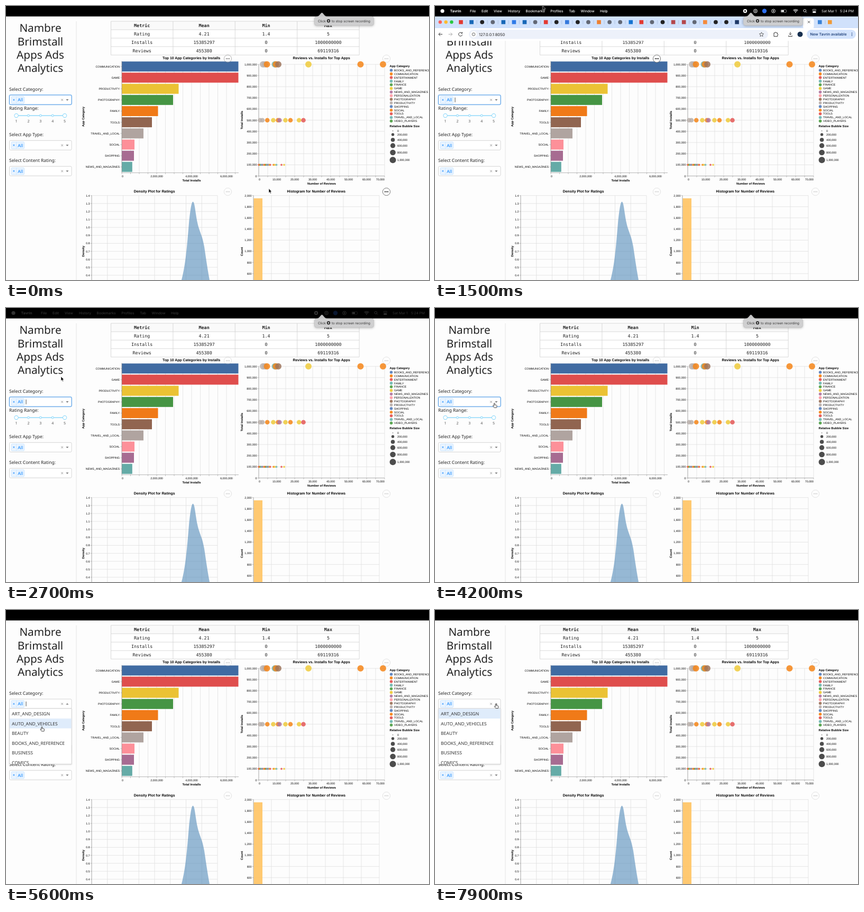
Write an HTML page that moves like this. It is 800 by 520 pixels and loops after 8000 ms.

```html
<!DOCTYPE html>
<html lang="en">
<head>
<meta charset="utf-8">
<title>Apps dashboard</title>
<style>
html, body { margin: 0; width: 100%; height: 100%; overflow: hidden; background: #fdfdfd; }
svg { display: block; width: 800px; height: 520px; font-family: "Liberation Sans", Arial, sans-serif; text-rendering: geometricPrecision; }
.ui { font-family: "Noto Sans", sans-serif; }
.mac { font-family: Inter, sans-serif; }
.mono { font-family: "DejaVu Sans Mono", monospace; }
.anim { animation: 8s linear infinite; }
.step { animation-timing-function: step-end; }

#mouse { animation-name: mouse; animation-timing-function: ease-in-out; }
@keyframes mouse {
  0% { transform: translate(497px, 346.5px); }
  3% { transform: translate(496px, 340px); }
  12.5% { transform: translate(260px, 40px); }
  16.5%, 24% { transform: translate(203.5px, -.5px); }
  33.75% { transform: translate(104px, 130px); }
  37.5%, 39.5% { transform: translate(106px, 145px); }
  50%, 62.5% { transform: translate(112.5px, 180.5px); }
  70%, 72% { transform: translate(68px, 221.5px); }
  80%, 82% { transform: translate(115px, 180px); }
  86.25%, 89% { transform: translate(116.3px, 195.2px); }
  94%, 100% { transform: translate(115.5px, 178px); }
}
#hand { animation-name: hand; }
@keyframes hand { 0% { opacity: 0; } 48% { opacity: 1; } 84% { opacity: 0; } 92.5%, 100% { opacity: 1; } }
#arrow { animation-name: arrow; }
@keyframes arrow { 0% { opacity: 1; } 48% { opacity: 0; } 84% { opacity: 1; } 92.5%, 100% { opacity: 0; } }

.open { animation-name: open; }
@keyframes open { 0% { visibility: hidden; } 62.5% { visibility: visible; } 81.25% { visibility: hidden; } 96.25%, 100% { visibility: visible; } }
.shut { animation-name: shut; }
@keyframes shut { 0% { visibility: visible; } 62.5% { visibility: hidden; } 81.25% { visibility: visible; } 96.25%, 100% { visibility: hidden; } }
#row { animation-name: row; }
@keyframes row { 0% { transform: none; } 67.5% { transform: translateY(18.6px); } 76% { transform: none; } 100% { transform: none; } }
#caret { animation: caret 1s -.7s step-end infinite; }
@keyframes caret { 0% { opacity: 1; } 50%, 100% { opacity: 0; } }

#bar { animation-name: bar; }
@keyframes bar { 0%, 13.5% { transform: translateY(-47px); } 17%, 28.5% { transform: none; } 32%, 100% { transform: translateY(-47px); } }
#menu { animation-name: menu; }
@keyframes menu { 0%, 12.5% { opacity: 0; } 16.5%, 28% { opacity: 1; } 33.75% { opacity: .2; } 37.5%, 100% { opacity: 0; } }
#tip { animation-name: tip; }
@keyframes tip { 0%, 60.5% { opacity: 1; } 63.5%, 100% { opacity: 0; } }
#more0 { animation-name: more0; }
@keyframes more0 { 0% { opacity: .55; } 2.5%, 6% { opacity: .2; } 11%, 26% { opacity: 1; } 31%, 100% { opacity: .2; } }
#more3 { animation-name: more3; }
@keyframes more3 { 0%, 3% { opacity: 1; } 8%, 100% { opacity: .2; } }
</style>
</head>
<body>
<svg id="stage" viewBox="0 0 800 520"></svg>
<script>
const range = n => [...Array(n).keys()];
const each = (list, fn) => list.map(fn).join('');
const rect = (x, y, w, h, fill, more = '') => `<rect x="${x}" y="${y}" width="${w}" height="${h}" fill="${fill}" ${more}/>`;
const dot = (x, y, r, fill, more = '') => `<circle cx="${x}" cy="${y}" r="${r}" fill="${fill}" ${more}/>`;
const path = (d, stroke, w = 1, fill = 'none') => `<path d="${d}" stroke="${stroke}" stroke-width="${w}" fill="${fill}"/>`;
// y is the vertical middle of the capitals
const text = (x, y, s, size, more = '') => `<text x="${x}" y="${y + size * .36}" font-size="${size}" ${more}>${s}</text>`;
const mid = 'text-anchor="middle"', end = 'text-anchor="end"', bold = 'font-weight="700"';
const commas = n => n.toLocaleString('en-US');

const GRID = '#dcdcdc', AXIS = '#888';
const hue = {
  blue: '#5b82bd', orange: '#f58518', red: '#e45756', teal: '#72b7b2', green: '#54a24b', yellow: '#eeca3b',
  purple: '#b279a2', pink: '#ff9da6', brown: '#9d755d', gray: '#bab0ac'
};

const title = (x, y, s) => text(x, y, s, 6.87, `${mid} ${bold}`);
const label = (x, y, s, more = mid) => text(x, y, s, 5.3, more);
const axisName = (x, y, s) => text(x, y, s, 5.8, `${mid} ${bold}`);
const sideName = (x, y, s) => `<g transform="translate(${x} ${y}) rotate(-90)">${axisName(0, 0, s)}</g>`;
const gridX = (xs, top, bottom) => path(each(xs, x => `M${x} ${top}V${bottom}`), GRID, .7);
const gridY = (ys, left, right) => path(each(ys, y => `M${left} ${y}H${right}`), GRID, .7);
const ticksX = (xs, y) => path(each(xs, x => `M${x} ${y}v2.6`), AXIS, .5);
const ticksY = (ys, x) => path(each(ys, y => `M${x} ${y}h-2.6`), AXIS, .5);

function sidebar() {
  const box = y => rect(6.5, y, 117.5, 18, '#fff', 'rx="2" stroke="#ccc" stroke-width=".8"');
  const tag = y => rect(10, y - 6.5, 24.5, 13, '#ebf5ff', 'rx="1.5" stroke="#b9dcff" stroke-width=".7"')
    + path(`M19.7 ${y - 6.5}v13`, '#b9dcff', .6)
    + text(14.9, y - .3, '×', 8, `${mid} fill="#007eff"`) + text(27.2, y, 'All', 8.5, `${mid} fill="#007eff"`)
    + path(`M104.2 ${y - 2}l3.8 3.8m0 -3.8l-3.8 3.8`, '#888', .8);
  const down = y => path(`M113.3 ${y - 1.3}h5.2l-2.6 2.7z`, 'none', 0, '#777');
  const xs = range(5).map(i => 19.5 + i * 22.9);
  return path('M133 29V520', '#ddd', .8) + '<g class="ui" fill="#222">'
    + each(['Nambre', 'Brimstall', 'Apps Ads', 'Analytics'], (s, i) => text(65, 42 + i * 25.3, s, 20.7, mid))
    + each([[158, 'Select Category:'], [194, 'Rating Range:'], [244.2, 'Select App Type:'], [293.2, 'Select Content Rating:']], ([y, s]) => text(6, y, s, 8.5))
    + each([169, 255.3, 304.3], box)
    + `<g class="anim step shut">${rect(6.5, 169, 117.5, 18, '#fff', 'rx="2" stroke="#c9e2fb" stroke-width="2.4"')}${rect(6.5, 169, 117.5, 18, '#fff', 'rx="2" stroke="#3d8fe0" stroke-width=".9"')}${down(178.3)}</g>`
    + each([178.3, 264.5, 313.5], tag) + down(264.5) + down(313.5)
    + `<g class="anim step open">${path('M113.3 179.6h5.2l-2.6 -2.7z', 'none', 0, '#777')}</g>`
    + `<path id="caret" d="M38 173.7v9" stroke="#222" stroke-width=".8"/>`
    + path('M19.5 208H111', '#abe2fb', 2)
    + each(xs, (x, i) => dot(x, 208, i % 4 ? 1.9 : 3.6, '#fff', 'stroke="#96dbfa" stroke-width="1.1"') + text(x, 218.6, i + 1, 7, `${mid} fill="#555"`))
    + '</g>';
}

function dropdown() {
  const names = ['ART_AND_DESIGN', 'AUTO_AND_VEHICLES', 'BEAUTY', 'BOOKS_AND_REFERENCE', 'BUSINESS', 'COMICS'];
  return `<g class="ui anim step open"><clipPath id="list"><rect x="6" y="187" width="119" height="105"/></clipPath>`
    + rect(6.5, 187, 117.5, 105.3, '#fff', 'stroke="#ccc" stroke-width=".8" style="filter:drop-shadow(0 1px 1px #0002)"')
    + `<g clip-path="url(#list)"><g id="row" class="anim step">${rect(6.9, 187.4, 116.7, 18.6, '#dfecfb')}</g>`
    + each(names, (s, i) => text(11, 197 + i * 18.55, s, 8.5, 'fill="#333"')) + '</g></g>';
}

function table() {
  const rows = [['Metric', 'Mean', 'Min', 'Max'], ['Rating', '4.21', '1.4', '5'], ['Installs', '15385297', '0', '1000000000'], ['Reviews', '455380', '0', '69119316']];
  return rect(198.5, 29, 469.5, 64, '#fff') + rect(198.5, 29, 469.5, 16, '#fafafa')
    + path(each(range(5), i => `M198.5 ${29 + i * 16}H668M${198.5 + i * 117.4} 29V93`), '#d0d0d0', .8)
    + '<g class="mono" fill="#222">'
    + each(rows, (r, j) => each(r, (s, i) => text(257.2 + i * 117.4, 37 + j * 16, s, 8.4, mid + (j ? '' : ' ' + bold)))) + '</g>';
}

function barChart() {
  const bars = [['COMMUNICATION', 439.5, '#406ba2'], ['GAME', 439.5, '#df4e4d'], ['PRODUCTIVITY', 326.5, '#ebc234'], ['PHOTOGRAPHY', 316, '#469544'], ['FAMILY', 287.5, '#f07a18'],
    ['TOOLS', 276, '#916550'], ['TRAVEL_AND_LOCAL', 260, '#b0a4a0'], ['SOCIAL', 243, '#fd9099'], ['SHOPPING', 242, '#a76c92'], ['NEWS_AND_MAGAZINES', 238.8, '#65aba7']];
  const xs = range(14).map(i => 219 + i * 16.5), y = i => 114.8 + i * 21.17;
  return gridX(xs, 105, 316.5)
    + each(bars, ([s, x, fill], i) => rect(219, y(i) - 9.5, x - 219, 19, fill) + label(215, y(i), s, end))
    + path('M219 104.5V316.5H440', AXIS, .6) + ticksX(xs, 316.5) + ticksY(range(10).map(y), 219)
    + label(220.5, 323, '0') + each([1, 2, 3], i => label(219 + i * 66, 323, commas(i * 2e6)))
    + title(350.7, 98.6, 'Top 10 App Categories by Installs')
    + axisName(351, 330.5, 'Total Installs') + sideName(146, 210, 'App Category');
}

function scatter() {
  const { blue, orange, red, teal, green, yellow, purple, pink, brown, gray } = hue;
  const xs = range(15).map(i => 478 + i * 17), ys = range(11).map(i => 322.6 - i * 21.18);
  const point = (y, r) => ([x, fill]) => dot(x, y, r, fill, 'opacity=".85"');
  const top = [[486, gray], [490, gray], [493.5, orange], [508.5, teal], [510.5, orange], [515, brown], [572, yellow], [670.5, orange], [713, orange]];
  const middle = [[480.5, gray], [485, gray], [494.2, orange], [505.5, yellow], [514.5, orange], [517.3, purple], [528.5, yellow], [538, orange], [554.2, yellow], [562.5, red]];
  const cycle = [red, blue, teal, orange, yellow, purple, green];
  const low = range(15).map(i => [478 + i * 1.55, cycle[i * 3 % 7]]).concat([[506, orange], [508.5, yellow], [511.5, teal], [521, red], [526, yellow]]);
  const kinds = ['BOOKS_AND_REFERENCE', 'COMMUNICATION', 'ENTERTAINMENT', 'FAMILY', 'FINANCE', 'GAME', 'NEWS_AND_MAGAZINES', 'PERSONALIZATION', 'PHOTOGRAPHY', 'PRODUCTIVITY', 'SHOPPING', 'SOCIAL', 'TOOLS', 'TRAVEL_AND_LOCAL', 'VIDEO_PLAYERS'];
  const colors = Object.values(hue), left = 'text-anchor="start"';
  const sizes = [237, 244, 254, 265, 278, 292.3];
  return gridX(xs, 110.8, 322.6) + gridY(ys, 478, 716)
    + path('M478 110.8V322.6H716', AXIS, .6) + ticksX(xs, 322.6) + ticksY(ys, 478)
    + each(low, point(301.4, 1.9)) + each(middle, point(216.7, 4.3)) + each(top, point(110.8, 6))
    + each(ys, (y, i) => label(474.5, y, commas(i * 1e5), end))
    + label(479.5, 329, '0') + each(range(6), i => label(512 + i * 34, 329, commas((i + 1) * 1e4))) + label(716, 329, '70,000', end)
    + title(596.7, 98.6, 'Reviews vs. Installs for Top Apps')
    + axisName(597, 336.8, 'Number of Reviews') + sideName(445.5, 216.5, 'Total Installs')
    + text(725.5, 113.6, 'App Category', 5.8, bold)
    + each(kinds, (s, i) => dot(728.6, 122 + i * 6.88, 2.8, colors[i % 10], 'opacity=".95"') + label(734, 122 + i * 6.88, s, left))
    + text(725.5, 228.4, 'Relative Bubble Size', 5.8, bold)
    + each(sizes, (y, i) => dot(731.6, y, i ? 6 * Math.sqrt(i / 5) : .7, '#4d4d4d') + label(740, y, commas(i * 2e5), left));
}

function density() {
  const xs = range(9).map(i => 162 + i * 29.75), ys = range(12).map(i => 359.7 + i * 15.13);
  return gridX(xs, 359.7, 520) + gridY(ys, 162, 400)
    + path('M329 530C339 500 342 460 346 412C349 384 351 371.5 353.5 371.5C357 371.5 358 392 362 411C366 430 371 433 375 457C379 484 382 506 387 530Z', 'none', 0, '#4682b48f')
    + path('M162 359.7V520', AXIS, .6) + ticksY(ys, 162)
    + each(ys, (y, i) => label(158.5, y, (1.4 - i / 10).toFixed(1), end))
    + title(280.7, 351.2, 'Density Plot for Ratings') + sideName(146, 465.5, 'Density');
}

function histogram() {
  const xs = range(8).map(i => 468 + i * 34), ys = range(8).map(i => 359.7 + i * 21.17);
  return gridX(xs, 359.7, 520) + gridY(ys, 468, 706) + rect(468.5, 365, 16.5, 155, '#ffc76a', 'opacity=".95"')
    + path('M468 359.7V520', AXIS, .6) + ticksY(ys, 468)
    + each(ys, (y, i) => label(464.5, y, commas(2000 - i * 200), end))
    + title(586.8, 351.2, 'Histogram for Number of Reviews') + sideName(446, 466, 'Count');
}

const more = (x, y, i) => `<g id="more${i}" class="anim" opacity=".2">${dot(x, y, 7.1, '#fff', 'stroke="#666" stroke-width=".9"')}${each([-2.7, 0, 2.7], d => dot(x + d, y, 1, '#111'))}</g>`;

function browser() {
  const B = '#1868b7', K = '#222', G = '#626875', R = '#e33a32';
  const tabs = [R, B, K, G, B, '#2f7be8', B, G, R, K, '#3579dc', K, G, '#ee8030', G, G, '#1674d1', R, G, K, '#b4474c', '#b4474c', G, '#f58a3a', K, K, '#1f3a68'];
  return `<clipPath id="below"><rect y="19.8" width="800" height="47"/></clipPath><g clip-path="url(#below)"><g id="bar" class="anim mac">`
    + rect(0, 19.8, 800, 24, '#d0e1fb') + rect(0, 42, 800, 24.3, '#fff') + rect(696, 23, 20.5, 20, '#fff', 'rx="4"')
    + each(['#ff5f57', '#febc2e', '#28c840'], (c, i) => dot(9.8 + i * 10.8, 30.5, 3.2, c))
    + each(tabs, (c, i) => {
      const x = 49 + i * 20.08;
      return (c === K || c === G ? dot(x, 30.6, 3.9, c) : rect(x - 3.8, 26.8, 7.6, 7.6, c)) + path(`M${x + 10} 27v7.5`, '#a4bad8', .7);
    })
    + path('M705 28.3l4.2 4.2m0 -4.2l-4.2 4.2', '#333', .9)
    + rect(724, 26.8, 7.6, 7.6, '#3b83d6') + rect(743, 26.8, 7.6, 7.6, '#f09a36') + path('M738 27v7.5', '#a4bad8', .7)
    + rect(64, 45, 566, 17.4, '#edf1fa', 'rx="8.7"') + dot(73, 53.7, 6, '#fff') + dot(73, 53.7, 2.8, 'none', 'stroke="#444" stroke-width=".8"')
    + text(83, 53.8, '127.0.0.1:8050', 7.5, 'fill="#222"')
    + path('M14 53.7H7m3 -3.1l-3.1 3.1l3.1 3.1', '#333', 1) + path('M25.5 53.7h7m-3 -3.1l3.1 3.1l-3.1 3.1', '#aaa', 1)
    + path('M51 51.6a3.5 3.5 0 1 0 .6 2.8M51.6 49.5v2.4h-2.4', '#333', 1)
    + path('M617.5 49.8l1.2 2.7 2.9.3-2.2 2 .6 2.9-2.5-1.5-2.5 1.5.6-2.9-2.2-2 2.9-.3z', '#444', .8)
    + path('M641 51h2a1 1 0 0 1 2.4 0h2.2v2.3a1.1 1.1 0 0 1 0 2.3v2.2H641z', '#333', 1)
    + path('M672 49.5v5m-2.3 -2.1l2.3 2.3l2.3 -2.3M668.7 56v1.7h6.6V56', '#333', 1)
    + dot(690.5, 53.7, 5, '#18304f') + rect(703, 45, 93, 17.2, '#d3e3fd', 'rx="8.6"')
    + text(709.5, 53.7, 'New Tavrin available', 7, 'font-weight="500" fill="#0b2f6b"') + each([51.3, 53.7, 56.1], y => dot(788.5, y, .75, '#0b2f6b'))
    + '</g></g>';
}

function menuBar() {
  const items = [[66, 'File'], [88, 'Edit'], [111, 'View'], [138, 'History'], [171.5, 'Bookmarks'], [218.3, 'Profiles'], [253.2, 'Tab'], [275.5, 'Window'], [312, 'Help']];
  const ring = (x, r) => dot(x, 9.5, r, 'none', 'stroke="#fff" stroke-width=".9"');
  return rect(0, 0, 800, 19.8, '#000') + '<g id="menu" class="anim mac" fill="#fff">'
    + dot(14, 9.5, 3.6, '#fff') + text(28.5, 9.7, 'Tavrin', 6.9, bold) + each(items, ([x, s]) => text(x, 9.7, s, 6.7, 'font-weight="500"'))
    + dot(586.5, 9.5, 3.7, '#fff') + rect(585.2, 8.2, 2.6, 2.6, '#000') + ring(606, 3.5) + ring(606, 1.5)
    + dot(623, 9.5, 4.2, '#2d6ff0') + ring(640, 3.4) + path('M639 7.8l2.8 1.7l-2.8 1.7z', 'none', 0, '#fff')
    + rect(654, 7, 10.5, 5.2, 'none', 'rx="1.5" stroke="#bbb" stroke-width=".7"') + rect(655, 8, 5, 3.2, '#fff')
    + path('M677.6 8.3q4.4 -3.6 8.8 0M679.2 10q2.8 -2.3 5.6 0', '#fff', 1.1) + dot(682, 11.8, 1, '#fff')
    + dot(699.3, 8.9, 2.4, 'none', 'stroke="#fff" stroke-width=".9"') + path('M701 10.6l2 2', '#fff', .9)
    + rect(714, 6.3, 6.6, 2.6, 'none', 'rx="1.3" stroke="#fff" stroke-width=".7"') + rect(714, 10.3, 6.6, 2.6, '#fff', 'rx="1.3"')
    + text(731, 9.7, 'Sat Mar 1', 6.6) + text(766, 9.7, '5:24 PM', 6.6) + '</g>';
}

const tooltip = () => '<g id="tip" class="anim mac" fill="#333">'
  + '<path d="M588 20C593 20 595 13 597.5 13S602 20 607 20H691.5Q695.5 20 695.5 24V33Q695.5 37 691.5 37H587.5Q583.5 37 583.5 33V24Q583.5 20 587.5 20Z" fill="#d0d0d1" fill-opacity=".95" stroke="#b4b4b4" stroke-width=".5" style="filter:drop-shadow(0 1.5px 2px #0004)"/>'
  + text(590, 28.3, 'Click', 6.3) + dot(610, 28.3, 3.2, '#333') + rect(608.9, 27.2, 2.2, 2.2, '#ddd') + text(616, 28.3, 'to stop screen recording', 6.3) + '</g>';

const pointer = () => '<g id="mouse" class="anim">'
  + `<g id="arrow" class="anim step">${path('M0 0V8.2L1.9 6.5 3.2 9.4 4.5 8.8 3.2 6 5.6 5.9Z', '#fff', .6, '#000')}</g>`
  + `<g id="hand" class="anim step">${path('M-1 1a.9.9 0 0 1 1.8 0v2.4l3 .7q1 .3 .8 1.3l-.7 3.2h-4.4l-2.6-3.4q.2-1.2 1.4-.5l.7.6z', '#111', .8, '#fff')}</g></g>`;

document.getElementById('stage').innerHTML = rect(0, 0, 800, 520, '#fdfdfd')
  + sidebar() + table() + barChart() + scatter() + density() + histogram()
  + each([[419.5, 100], [719.5, 100], [419.5, 352.5], [719.5, 352.5]], ([x, y], i) => more(x, y, i))
  + dropdown() + browser() + menuBar() + tooltip() + pointer();
</script>
</body>
</html>
```
